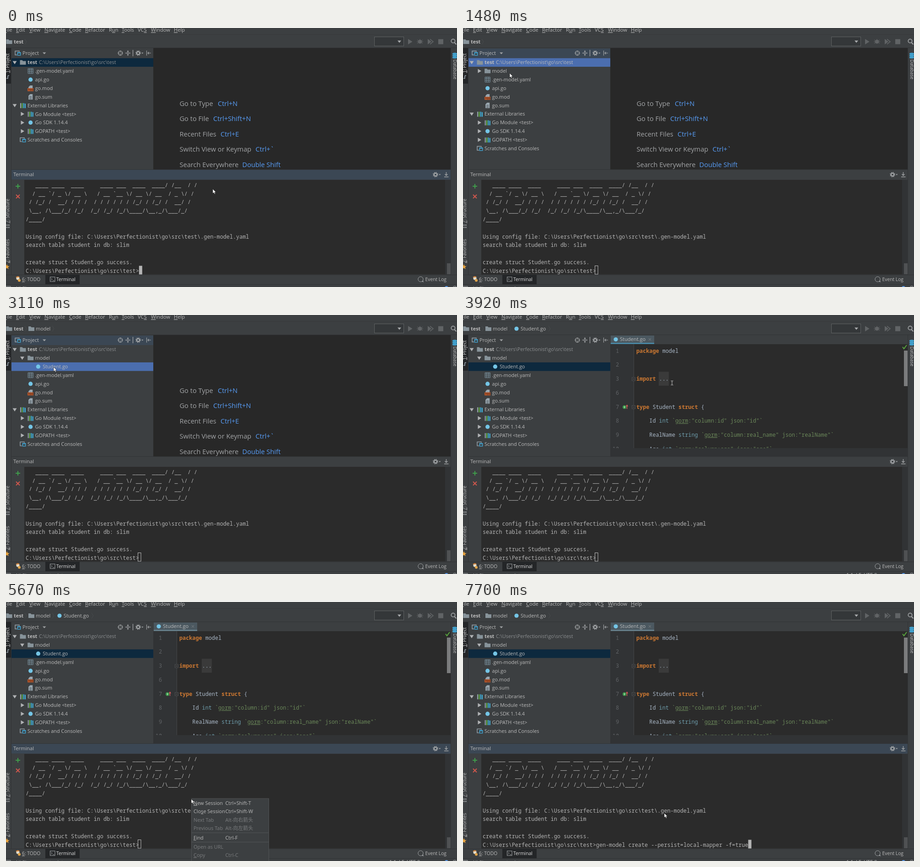
Write an HTML page that moves like this. It is 986x568 px and loops after 8 s.

```html
<!DOCTYPE html>
<html lang="en">
<head>
<meta charset="utf-8">
<title>Code generator in an IDE</title>
<style>
html, body { margin: 0; width: 100%; height: 100%; overflow: hidden; background: #3c3f41; }
svg { display: block; width: 986px; height: 568px; }
text { font-family: "Open Sans", "Noto Sans CJK SC", sans-serif; font-size: 10.9px; fill: #bbb; white-space: pre; }
.mono { font-family: "Noto Sans Mono", "DejaVu Sans Mono", monospace; font-size: 11.8px; fill: #b4b4b4; }
.hint { font-size: 14.6px; fill: #a2a4a6; }
.side { font-size: 9.9px; }
.foot { font-size: 10.3px; }
.lit { fill: #e0e0e0; }
.b { font-weight: 700; }
.u { text-decoration: underline; }
.kw { fill: #cc7832; font-weight: 700; }
.ty { fill: #6f9fae; }
.st { fill: #6a8759; }
.id { fill: #a9b7c6; }
.wave { text-decoration: underline; text-decoration-color: #59885a; }
</style>
</head>
<body>
<svg id="stage" viewBox="0 0 986 568" xmlns="http://www.w3.org/2000/svg"></svg>
<script>
const LOOP = 8000, CH = 7.08;
const HOME = 'C:\\Users\\Perfectionist\\go\\src\\test';
const PANEL = '#3c3f41', EDIT = '#2b2b2b', GUTTER = '#313335', PRESSED = '#242628';
const HEAD = '#3b4754', ACTIVE = '#4b6eaf', DIM = '#0d293e', ICON = '#a0a3a5';

// Drawing helpers, each returning markup
const esc = s => s.replace(/&/g, '&amp;').replace(/</g, '&lt;');
const rect = (x, y, w, h, fill, more = '') => `<rect x="${x}" y="${y}" width="${w}" height="${h}" fill="${fill}" ${more}/>`;
const path = (d, fill, stroke = 'none', w = 1) => `<path d="${d}" fill="${fill}" stroke="${stroke}" stroke-width="${w}"/>`;
const line = (d, stroke, w = 1) => path(d, 'none', stroke, w);
const dot = (x, y, r, fill, more = '') => `<circle cx="${x}" cy="${y}" r="${r}" fill="${fill}" ${more}/>`;
const label = (x, y, html, cls = '', more = '') => `<text x="${x}" y="${y}" class="${cls}" ${more}>${html}</text>`;
const span = (cls, s) => `<tspan class="${cls}">${esc(s)}</tspan>`;
const group = (id, html, more = '') => `<g id="${id}" ${more}>${html}</g>`;
// Text with one underlined letter
const mnemonic = (s, i) => esc(s.slice(0, i)) + span('u', s[i]) + esc(s.slice(i + 1));

// Icons are centred on x, y
const icons = {
  folder: (x, y) => path(`M${x - 6.5} ${y - 5}h5l1.5 2h6.5v8h-13z`, '#87939a'),
  go: (x, y) => dot(x, y, 4.6, '#74c5e6'),
  yaml: (x, y) => line(`M${x - 5.5} ${y - 5.5}h11v11h-11zm0 3h11m-11 4h11m-7.5 -7v11m4 -11v11`, '#7d95a3'),
  sum: (x, y) => path(`M${x - 1} ${y - 6}h5.5v12h-9v-8.5z`, '#9aa7b0') + line(`M${x - 2.5} ${y - .5}h5m-5 2.5h5m-5 2.5h5`, '#4a5258'),
  mod: (x, y) => path(`M${x - 1} ${y - 6}h5.5v6h-9v-2.5z`, '#9aa7b0') + rect(x - 6.5, y, 13, 6.5, '#c75c2c') +
    line(`M${x - 4.5} ${y + 5}v-3.5h2v3.5m2 0v-3.5h2v3.5zm4 0v-3.5h2v3.5z`, '#4c2a1a', .8),
  lib: (x, y) => rect(x - 6, y - 5, 2, 11, '#9aa7b0') + rect(x - 2.7, y - 5, 2, 11, '#62b543') +
    rect(x + .7, y - 5, 2, 11, '#40b6e0') + rect(x + 4, y - 4, 2, 10, '#40b6e0'),
  view: (x, y) => line(`M${x - 2} ${y + 4}h-4v-8.5h9v2`, '#9aa7b0', 1.4) + rect(x - 1.5, y - 2, 8, 7.5, '#40a0cc') + rect(x, y + .5, 5, 3.5, PANEL)
};
const gear = (x, y) => dot(x, y, 3.2, 'none', `stroke="${ICON}" stroke-width="2.2"`) +
  dot(x, y, 5, 'none', `stroke="${ICON}" stroke-width="1.6" stroke-dasharray="2 1.93"`) + path(`M${x + 7} ${y - 1}h4.5l-2.25 2.5z`, ICON);

const menuBar = () => [['File', 0, -4], ['Edit', 0, 22], ['View', 0, 51], ['Navigate', 0, 84], ['Code', 0, 138], ['Refactor', 0, 173],
  ['Run', 1, 225], ['Tools', 0, 253], ['VCS', 2, 288], ['Window', 0, 317], ['Help', 0, 367]]
  .map(([s, i, x]) => label(x, 8.4, mnemonic(s, i), '', 'style="font-size:11.1px"')).join('');

const chevron = x => line(`M${x} 24l4 6 -4 6`, '#484b4d');
const navBar = () => line('M0 14.5H986', '#37393b') + line('M0 43.5H986', '#323436') +
  icons.folder(7, 30) + label(17, 33.8, 'test', 'b') + chevron(41) +
  group('crumbModel', icons.folder(55.5, 30) + label(65, 33.8, 'model') + chevron(101)) +
  group('crumbFile', icons.go(117, 30) + label(126, 33.8, 'Student.go') + chevron(187)) +
  rect(805.5, 19.5, 64, 20, '#343739', 'stroke="#5e6162"') + path('M856 27.5h8l-4 5z', '#a9abad') +
  path('M879 24v12l9.5 -6z', '#606365') +
  dot(905, 30, 4.3, '#606365') + line('M899 26l12 8m0 -8l-12 8m-1 -4h14m-7 -6v3', '#606365') +
  path('M922 24v12l8 -6z', '#606365') + line('M927 24.5l7 5.5 -7 5.5', '#606365', 1.6) +
  rect(945, 24.5, 11, 11, '#606365') +
  dot(977.5, 28.5, 4.2, 'none', `stroke="${ICON}" stroke-width="1.7"`) + line('M980.5 32l4 4', ICON, 2);

const turned = (x, y, html, deg = -90, cls = '') => label(0, 0, html, 'side ' + cls, `transform="translate(${x} ${y}) rotate(${deg})"`);
const grip = y => [1, 5].map(x => rect(x, y, 2.5, 2.5, ICON) + rect(x, y + 5, 2.5, 2.5, ICON)).join('');
const sideBars = () => rect(0, 44, 11, 78, PRESSED) + line('M11.5 44V541M972.5 44V541', '#323436') +
  turned(6.8, 98.5, mnemonic('1: Project', 0), -90, 'lit') + line('M1 110.5h3v-6m0 0h3', '#9aa7b0', 1.5) +
  turned(6.8, 428, mnemonic('7: Structure', 0)) + grip(431) +
  turned(6.8, 515.5, mnemonic('2: Favorites', 0)) +
  path('M2 518l1.7 4h4l-3.2 2.6 1.2 4.2L2 526.3l-3.7 2.5V522h2z', '#e8a33d') +
  turned(978.3, 69, 'Database', 90) +
  [55.5, 59.5, 63.5].map(y => path(`M976 ${y}q5 -2.5 10 0v2.5q-5 2 -10 0z`, '#40a0cc')).join('');

const projectHead = () => `<rect id="projHead" x="12" y="45" width="310" height="21"/>` +
  icons.view(26, 55) + label(36, 58.9, 'Project', '', 'style="font-size:11.1px"') + path('M80 53.5h7.5l-3.75 4z', ICON) +
  dot(250, 55, 4.6, 'none', `stroke="${ICON}" stroke-width="1.4"`) + line('M250 49.5v4m0 3v4M244.5 55h4m3 0h4', ICON, 1.2) +
  line('M261 55h11m-5.5 -6v3.5m0 5v3.5', ICON, 1.3) + path('M264 51h5l-2.5 2.5zm0 8h5l-2.5 -2.5z', ICON) + line('M277.5 48v14', ICON, 1.3) +
  gear(289, 55) + line('M307.5 49.5v11M310 55h7m-4.5 -2.5l-2.5 2.5 2.5 2.5', ICON, 1.2);

// Rows: level, icon, text, arrow (v open, > closed)
const FILES = [[1, 'yaml', '.gen-model.yaml'], [1, 'go', 'api.go'], [1, 'mod', 'go.mod'], [1, 'sum', 'go.sum'],
  [0, 'lib', 'External Libraries', 'v'], [1, 'lib', 'Go Module <test>', '>'], [1, 'go', 'Go SDK 1.14.4', '>'],
  [1, 'lib', 'GOPATH <test>', '>'], [0, 'view', 'Scratches and Consoles']];
const ROW = 18.85;
const treeRow = ([lev, icon, s, arrow], i) => {
  const y = 75.5 + ROW * i, ax = 19 + 16.5 * lev;
  const tip = arrow === 'v' ? path(`M${ax - 4.5} ${y - 3}h9l-4.5 7z`, '#b0b2b4') :
    arrow ? path(`M${ax - 3} ${y - 4.5}l7.5 4.5 -7.5 4.5z`, '#b0b2b4') : '';
  return tip + icons[icon](37 + 16.7 * lev, y) + label(47 + 16.6 * lev, y + 3.9, esc(s));
};
const tree = () => rect(12, 66, 310, 244, PANEL) + `<rect id="sel" x="12" width="310" height="18.8"/>` +
  path('M14.5 72.5h9l-4.5 7z', '#b0b2b4') + icons.folder(37, 75.5) + label(47, 79.4, 'test', 'b') +
  label(72, 79.4, HOME, '', 'id="home"') +
  group('modelShut', treeRow([1, 'folder', 'model', '>'], 1)) +
  group('modelOpen', treeRow([1, 'folder', 'model', 'v'], 1) + treeRow([2, 'go', 'Student.go'], 2)) +
  group('files', FILES.map((r, i) => treeRow(r, i + 1)).join(''));

const hints = () => rect(322, 44, 650, 266, '#282828') +
  [['Go to Type', 463, 'Ctrl+N'], ['Go to File', 453, 'Ctrl+Shift+N'], ['Recent Files', 469, 'Ctrl+E'],
   ['Switch View or Keymap', 545.5, 'Ctrl+`'], ['Search Everywhere', 516.5, 'Double Shift']]
  .map(([s, x, key], i) => label(379.5, 170.6 + 33.6 * i, s, 'hint') + label(x, 170.6 + 33.6 * i, key, 'hint', 'style="fill:#589df6"')).join('');

const field = (name, type, col, json) => '    ' + span('id', name) + ' ' + span('ty', type) + ' ' + span('st', '`') +
  span('st wave', 'gorm') + span('st', `:"column:${col}" json:"${json}"\``);
const CODE = [
  [1, span('kw', 'package') + span('id', ' model')], [2, ''],
  [3, span('kw', 'import') + span('id', ' ...')], [6, ''],
  [7, span('kw', 'type') + span('id', ' Student ') + span('kw', 'struct') + span('id', ' {')],
  [8, field('Id', 'int', 'id', 'id')], [9, field('RealName', 'string', 'real_name', 'realName')], [10, field('Age', 'int', 'age', 'age')]];
const PITCH = 30.75;
const foldMark = y => rect(369.5, y - 3.5, 7, 7, EDIT, 'stroke="#505356"') + line(`M371 ${y}h4`, '#6c6f72');
const editor = () => rect(322, 44, 650, 20, PANEL) + rect(323, 45, 95, 17, '#4b5860') +
  `<rect id="tabLine" x="323" y="61" width="95" height="2.5"/>` + icons.go(334, 53.5) +
  label(343, 57.4, 'Student.go', '', 'style="font-size:11.1px"') + line('M406 51l5 5m0 -5l-5 5', '#7d8083') +
  rect(322, 64, 650, 228, EDIT) + rect(322, 64, 51, 228, GUTTER) + line('M373.5 64V292', '#434648') +
  `<g clip-path="url(#codeClip)"><g id="code">` + rect(428, 124.5, 22, 30.5, '#3a3a3a') +
  CODE.map(([n, html], i) => {
    const y = 82.6 + PITCH * i;
    return label(341, y, n, 'mono', 'text-anchor="end" style="fill:#606366"') + label(379, y, html, 'mono');
  }).join('') +
  foldMark(140.5) + foldMark(202) + dot(353, 202, 4, '#3f9a4c') + line('M353 200v4', '#dfe', 1.2) +
  line('M358.5 206v-8m-2 2.5l2 -3 2 3', '#d95b5b', 1.3) + '</g></g>' +
  line('M961 70l3 4 6 -8', '#59a83e', 2) + `<rect id="thumb" x="964" width="8" height="78" fill="#7b7c7d"/>` +
  rect(322, 292, 650, 18, GUTTER);

const LOG = [
  '   ____ ____  ____     ____ ___  ____  ____/ /__  / /',
  '  / __ `/ _ \\/ __ \\   / __ `__ \\/ __ \\/ __  / _ \\/ /',
  ' / /_/ /  __/ / / /  / / / / / / /_/ / /_/ /  __/ /',
  ' \\__, /\\___/_/ /_/  /_/ /_/ /_/\\____/\\__,_/\\___/_/',
  '/____/', '', `Using config file: ${HOME}\\.gen-model.yaml`,
  'search table student in db: slim', '', 'create struct Student.go success.', HOME + '>'];
const COMMAND = 'gen-model create --persist=local-mapper -f=true';
const PROMPT_X = 43 + CH * LOG[10].length;
const terminal = () => line('M12 310.5H972', '#323436') + `<rect id="termHead" x="12" y="311" width="960" height="21.5"/>` +
  label(16, 325.4, 'Terminal', '', 'style="font-size:11.1px"') + gear(939, 321.5) +
  line('M958 326.5h9.5M962.5 316v7.5m-3 -3l3 3 3 -3', ICON, 1.4) +
  rect(12, 332.5, 28, 208, PANEL) + rect(40, 333, 920, 207.5, EDIT) + rect(960, 333, 12, 207.5, GUTTER) + rect(964, 516, 8, 24, '#4f5153') +
  line('M26 342v10m-5 -5h10', '#3f9f4b', 2) + line('M22 365.5l8 8m0 -8l-8 8', '#d0574d', 2) +
  LOG.map((s, i) => label(43, 348.7 + 18.81 * i, esc(s), 'mono')).join('') +
  label(PROMPT_X, 536.8, COMMAND, 'mono', 'id="command"') + `<rect id="caret"/>`;

const footer = () => rect(0, 541, 986, 27, PANEL) + line('M0 541.5H986M0 562.5H986', '#323436') + rect(86, 541, 75, 21, PRESSED) +
  dot(26, 549, 3.6, '#e3dccb') + path('M21 547q4 -5 9 -1l-4 1z', '#d9863b') + dot(29, 553.5, 3, '#e0a44a') +
  label(35, 555.2, mnemonic('6: TODO', 0), 'foot') +
  rect(96.5, 546, 10.5, 10, 'none', `stroke="${ICON}"`) + line('M98.5 548.5l2.5 2.5 -2.5 2.5m4 .5h3', ICON) + label(110, 555.2, 'Terminal', 'foot lit') +
  dot(906.5, 551, 5.6, 'none', `stroke="${ICON}"`) + path('M909 556l4 1.8 -1.2 -4z', ICON) + label(916.5, 555.2, 'Event Log', 'foot') +
  line('M0 566.5h10v2', ICON) + label(20, 575, 'All files are up-to-date', '') +
  group('status', label(838, 574.3, '1:1  LF  UTF-8')) + dot(963, 570, 4, '#589df6') + dot(981, 570, 4, 'none', `stroke="${ICON}"`);

const ITEMS = [[440.5, 'New Session', 0, 'Ctrl+Shift-T', 1], [459, 'Close Session', 3, 'Ctrl+Shift-W', 1], [477.5, 'Next Tab', -1, 'Alt-向右箭头'],
  [496, 'Previous Tab', -1, 'Alt-向左箭头'], [516.5, 'Find', 0, 'Ctrl-F', 1], [537, 'Open as URL', -1, ''], [555, 'Copy', 0, 'Ctrl-C']];
const popup = () => rect(405.5, 431, 169, 150, PANEL, 'stroke="#505355"') + `<rect id="hover" x="406" width="168" height="18.6" fill="${ACTIVE}"/>` +
  line('M406 506H574M406 526.5H574', '#515456') +
  ITEMS.map(([y, s, i, key, on]) => {
    const tone = on ? '' : 'style="fill:#7a7c7e"';
    return label(410, y + 4, i < 0 ? s : mnemonic(s, i), '', tone) + label(479.5, y + 4, key, '', tone);
  }).join('');

const pointer = () => group('mouse', group('arrow', path('M0 0V9.8L2.3 7.8 4 11.3 5.6 10.6 4 7.2H7Z', '#fff', '#111', .6)) +
  group('beam', line('M-2.5 -4.5h2l.5 .5 .5 -.5h2M0 -4V4M-2.5 4.5h2l.5 -.5 .5 .5h2', '#c8c8c8')));

const stage = document.getElementById('stage');
stage.innerHTML = '<clipPath id="codeClip"><rect x="322" y="64" width="642" height="228"/></clipPath>' + rect(0, 0, 986, 568, PANEL) +
  menuBar() + navBar() + projectHead() + tree() + group('hints', hints()) + group('editor', editor()) +
  terminal() + sideBars() + footer() + group('popup', popup()) + pointer();

const el = {};
stage.querySelectorAll('[id]').forEach(e => el[e.id] = e);
const show = (id, on) => el[id].setAttribute('display', on ? 'inline' : 'none');
const set = (id, attrs) => { for (const k in attrs) el[id].setAttribute(k, attrs[k]); };

const BURSTS = [[0, 0, 1], [400, 1360, 8], [1480, 2420, 7], [2570, 2570, 1], [2870, 3770, 8], [3920, 3920, 1],
  [4590, 5550, 8], [5670, 6570, 8], [6720, 6720, 1], [7000, 7420, 4], [7700, 7700, 1]];
function refreshed(t) {
  const [a, b, n] = BURSTS.filter(s => s[0] <= t).pop();
  if (n < 2) return a;
  const gap = (b - a) / (n - 1);
  return a + gap * Math.min(n - 1, Math.floor((t - a) / gap + 1e-6));
}

// Mouse: time, x, y
const TRACK = [[270, 452, 353], [1200, 106, 78], [1480, 102, 99], [2100, 102, 97], [2570, 104, 114], [3100, 104, 114], [3640, 457, 149],
  [4450, 457, 149], [5550, 405, 432], [5750, 405, 432], [6570, 440, 572], [7699, 440, 572], [7700, 440, 463], [LOOP, 440, 463]];
function mouseAt(t) {
  if (t <= TRACK[0][0]) return TRACK[0].slice(1);
  const i = TRACK.findIndex(k => k[0] >= t);
  const [t0, x0, y0] = TRACK[i - 1], [t1, x1, y1] = TRACK[i];
  const p = (t - t0) / (t1 - t0), e = p * p * (3 - 2 * p);
  return [x0 + (x1 - x0) * e, y0 + (y1 - y0) * e];
}

function draw(time) {
  const t = refreshed(time), [mx, my] = mouseAt(t);
  const opened = t >= 3120, termFocus = t < 1080 || t >= 5130, treeFocus = !termFocus && !opened;
  const menu = t >= 5670 && t < 7000, pasted = t >= 7130;
  const depth = t < 1080 ? 0 : t < 2100 ? 1 : 2;
  const picked = t < 1780 ? 0 : t < 2570 ? 1 : 2;

  set('projHead', { fill: treeFocus ? HEAD : PANEL });
  set('termHead', { fill: termFocus ? HEAD : PANEL });
  set('sel', { y: 66.2 + ROW * picked, fill: treeFocus ? ACTIVE : DIM });
  el.home.style.fill = picked === 0 && treeFocus ? '#bbb' : '#8c8f91';
  show('modelShut', depth === 1);
  show('modelOpen', depth === 2);
  set('files', { transform: `translate(0 ${ROW * depth})` });
  show('crumbModel', picked > 0);
  show('crumbFile', opened);
  show('status', opened);

  show('hints', !opened);
  show('editor', opened);
  const scroll = t >= 3630 && t < 3920 ? PITCH : 0;
  set('code', { transform: `translate(0 ${-scroll})` });
  set('thumb', { y: 78 + scroll * .36 });
  set('tabLine', { fill: termFocus ? '#6a8592' : '#4a90b0' });

  show('command', pasted);
  const solid = termFocus && !menu;
  const cx = pasted ? PROMPT_X + CH * COMMAND.length : PROMPT_X;
  set('caret', solid ? { x: cx, y: 521.5, width: 7, height: 19, fill: '#b4b4b4', stroke: 'none' }
    : { x: 288.5, y: 521.5, width: 6.5, height: 18.5, fill: 'none', stroke: '#bbb' });

  show('popup', menu);
  const item = t > 5750 && ITEMS.find(r => r[4] && Math.abs(my - r[0]) < 9.2);
  show('hover', t >= 6720 || item);
  set('hover', { y: t >= 6720 ? 565 : item ? item[0] - 9.3 : 0 });

  const typing = opened && mx > 374 && mx < 964 && my > 64 && my < 292;
  set('mouse', { transform: `translate(${mx} ${my})` });
  show('beam', typing);
  show('arrow', !typing);
}

const start = performance.now();
function tick() {
  draw((performance.now() - start) % LOOP);
  requestAnimationFrame(tick);
}
tick();
</script>
</body>
</html>
```
